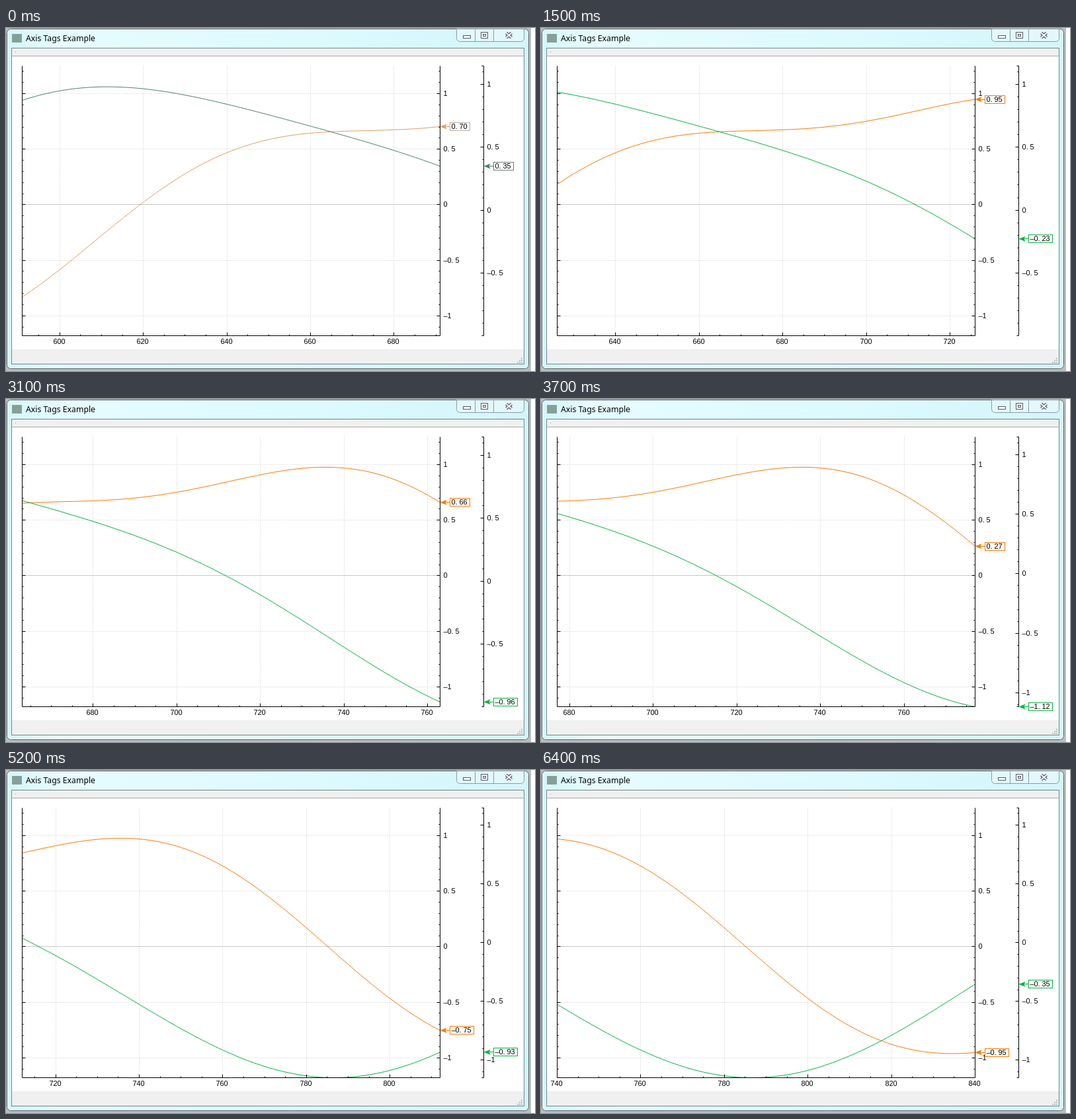
Write an HTML page with a canvas that moves like this. It is 800 by 520 pixels and loops after 6.5 s.

```html
<!DOCTYPE html>
<html lang="en">
<head>
<meta charset="utf-8">
<title>Axis Tags Example</title>
<style>
  html, body { margin: 0; width: 100%; height: 100%; overflow: hidden; background: #fff; }
  canvas { display: block; }
</style>
</head>
<body>
<canvas id="stage" width="800" height="520"></canvas>
<script>
const ctx = document.getElementById('stage').getContext('2d');
const LOOP = 6500, STEP = 100;
const LEFT = 24, RIGHT = 656, TOP = 57, BOTTOM = 466, AXIS2 = 722, SPAN = 100;
const CELL = 6; // digit pitch

const waveA = n => Math.sin(n / 50) + Math.sin(n / 50 / 0.3843) * 0.25;
const waveB = n => Math.cos(n / 50) + Math.sin(n / 50 / 0.4364) * 0.15;

const vivid = { a: '#fa7800', b: '#00b43c', boxA: '#fa7800', boxB: '#00b43c' };
const muted = { a: '#dca05f', b: '#4c8068', boxA: '#b5aca2', boxB: '#6e7a75' };

function line(x1, y1, x2, y2, color = '#000', dash = []) {
  ctx.strokeStyle = color;
  ctx.setLineDash(dash);
  ctx.beginPath();
  ctx.moveTo(x1 + 0.5, y1 + 0.5);
  ctx.lineTo(x2 + 0.5, y2 + 0.5);
  ctx.stroke();
  ctx.setLineDash([]);
}

function rect(x, y, w, h, fill, stroke) {
  if (fill) { ctx.fillStyle = fill; ctx.fillRect(x, y, w, h); }
  if (stroke) { ctx.strokeStyle = stroke; ctx.strokeRect(x + 0.5, y + 0.5, w, h); }
}

// Fixed-pitch digits, one per cell
function digits(text, x, y) {
  ctx.font = '11px "Liberation Sans", Arial, sans-serif';
  ctx.fillStyle = '#000';
  [...text.replace('-', '\u2013')].forEach((c, i) => ctx.fillText(c, x + i * CELL, y + 4));
}

function drawWindow() {
  rect(0, 0, 800, 520, '#fff');
  rect(0, 0, 794, 520, '#b9bfc1');

  const glass = ctx.createLinearGradient(0, 0, 791, 0);
  glass.addColorStop(0, '#d3f6fb');
  glass.addColorStop(0.1, '#e6fcff');
  glass.addColorStop(0.6, '#dcfaff');
  glass.addColorStop(1, '#d3f5fb');
  ctx.beginPath();
  ctx.roundRect(1.5, 1.5, 789, 515, 6);
  ctx.fillStyle = glass;
  ctx.fill();
  ctx.strokeStyle = '#4b5b60';
  ctx.stroke();
  ctx.beginPath();
  ctx.roundRect(2.5, 2.5, 787, 513, 5);
  ctx.strokeStyle = '#f2feff';
  ctx.stroke();

  rect(9, 9, 15, 13, '#87a096');
  ctx.fillStyle = '#000';
  ctx.font = '12.25px "Noto Sans", "Open Sans", sans-serif';
  ctx.fillText('Axis Tags Example', 30, 20);

  drawButtons();

  rect(8, 30, 775, 479, '#f0f0f0', '#6d878e');
  line(9, 42, 782, 42, '#a9a9a9');
  rect(9, 43, 774, 444, '#fff');
  rect(14, 36, 1, 1, '#888');
  for (let row = 0; row < 3; row++)
    for (let col = 2 - row; col < 3; col++)
      rect(773 + col * 3, 500 + row * 3, 2, 2, '#bcbcbc');
}

function drawButtons() {
  ctx.beginPath();
  ctx.roundRect(681.5, 1.5, 102, 19, [0, 0, 5, 5]);
  ctx.fillStyle = '#e2f8fc';
  ctx.fill();
  ctx.strokeStyle = '#8a9da2';
  ctx.stroke();
  line(709, 2, 709, 20, '#8a9da2');
  line(737, 2, 737, 20, '#8a9da2');
  const ink = '#535666';
  rect(691, 11, 11, 4, '#fff', ink);
  rect(718, 6, 10, 9, '#fff', ink);
  rect(721, 9, 4, 3, '#e2f8fc', ink);
  for (const [color, width] of [[ink, 4.5], ['#fff', 2]]) {
    ctx.strokeStyle = color;
    ctx.lineWidth = width;
    ctx.beginPath();
    ctx.moveTo(756.5, 7.5); ctx.lineTo(764.5, 14.5);
    ctx.moveTo(764.5, 7.5); ctx.lineTo(756.5, 14.5);
    ctx.stroke();
  }
  ctx.lineWidth = 1;
}

// Value scale covering every sample up to the last one
function valueScale(wave, last) {
  let lo = Infinity, hi = -Infinity;
  for (let n = 0; n <= last; n++) {
    lo = Math.min(lo, wave(n));
    hi = Math.max(hi, wave(n));
  }
  const y = v => BOTTOM - (v - lo) / (hi - lo) * (BOTTOM - TOP);
  return { lo, hi, y };
}

function eachTick(lo, hi, perUnit, majorEvery, visit) {
  for (let i = Math.ceil(lo * perUnit); i <= Math.floor(hi * perUnit); i++)
    visit(i / perUnit, i % majorEvery === 0);
}

function valueAxis(x, scale, inward, labelled) {
  line(x, TOP, x, BOTTOM);
  eachTick(scale.lo, scale.hi, 10, 5, (v, major) => {
    const y = Math.round(scale.y(v));
    line(x, y, x + inward * (major ? 5 : 2), y);
    if (major && labelled) digits(String(v), x + 5.5, y);
  });
}

function curve(wave, scale, xOf, last, color) {
  ctx.strokeStyle = color;
  ctx.beginPath();
  for (let n = last - SPAN; n <= last; n++)
    ctx.lineTo(xOf(n) + 0.5, scale.y(wave(n)) + 0.5);
  ctx.stroke();
}

function tag(x, value, scale, color, boxColor) {
  const exact = scale.y(value), y = Math.round(exact), text = value.toFixed(2);
  line(x + 8, y, x + 15, y, color);
  ctx.fillStyle = color;
  ctx.beginPath();
  for (const [dx, dy] of [[0, 0], [10, 4], [8, 0], [10, -4]])
    ctx.lineTo(x + 0.5 + dx, exact + 0.5 + dy);
  ctx.fill();
  rect(x + 15, y - 6, text.length * CELL + 6, 12, '#fff', boxColor);
  digits(text, x + 17.5, y);
}

function drawPlot(last, colors) {
  const first = last - SPAN;
  const xOf = n => LEFT + (n - first) / SPAN * (RIGHT - LEFT);
  const scaleA = valueScale(waveA, last), scaleB = valueScale(waveB, last);

  eachTick(first, last, 0.2, 4, (n, major) => {
    const x = Math.round(xOf(n));
    if (major) line(x, BOTTOM, x, TOP, '#c8c8c8', [1, 2]);
  });
  eachTick(scaleA.lo, scaleA.hi, 2, 1, v => {
    const y = Math.round(scaleA.y(v));
    line(LEFT, y, RIGHT, y, '#c8c8c8', v ? [1, 2] : []);
  });

  ctx.save();
  ctx.beginPath();
  ctx.rect(LEFT, TOP, RIGHT - LEFT + 1, BOTTOM - TOP + 1);
  ctx.clip();
  curve(waveA, scaleA, xOf, last, colors.a);
  curve(waveB, scaleB, xOf, last, colors.b);
  ctx.restore();

  line(LEFT, BOTTOM, RIGHT, BOTTOM);
  eachTick(first, last, 0.2, 4, (n, major) => {
    const x = Math.round(xOf(n));
    line(x, BOTTOM, x, BOTTOM - (major ? 5 : 2));
    if (major) digits(String(n), x - 9.5, 475);
  });
  valueAxis(LEFT, scaleA, 1, false);
  valueAxis(RIGHT, scaleA, -1, true);
  valueAxis(AXIS2, scaleB, -1, true);
  for (const y of [TOP, BOTTOM]) line(AXIS2 - 3, y, AXIS2, y);

  tag(RIGHT, waveA(last), scaleA, colors.a, colors.boxA);
  tag(AXIS2, waveB(last), scaleB, colors.b, colors.boxB);
}

const start = performance.now();
function render() {
  const step = Math.floor((performance.now() - start) % LOOP / STEP);
  drawWindow();
  // Seven samples arrive every three steps; the first step has a duller palette
  drawPlot(691 + Math.round(step * 7 / 3), step ? vivid : muted);
  requestAnimationFrame(render);
}
render();
</script>
</body>
</html>
```
